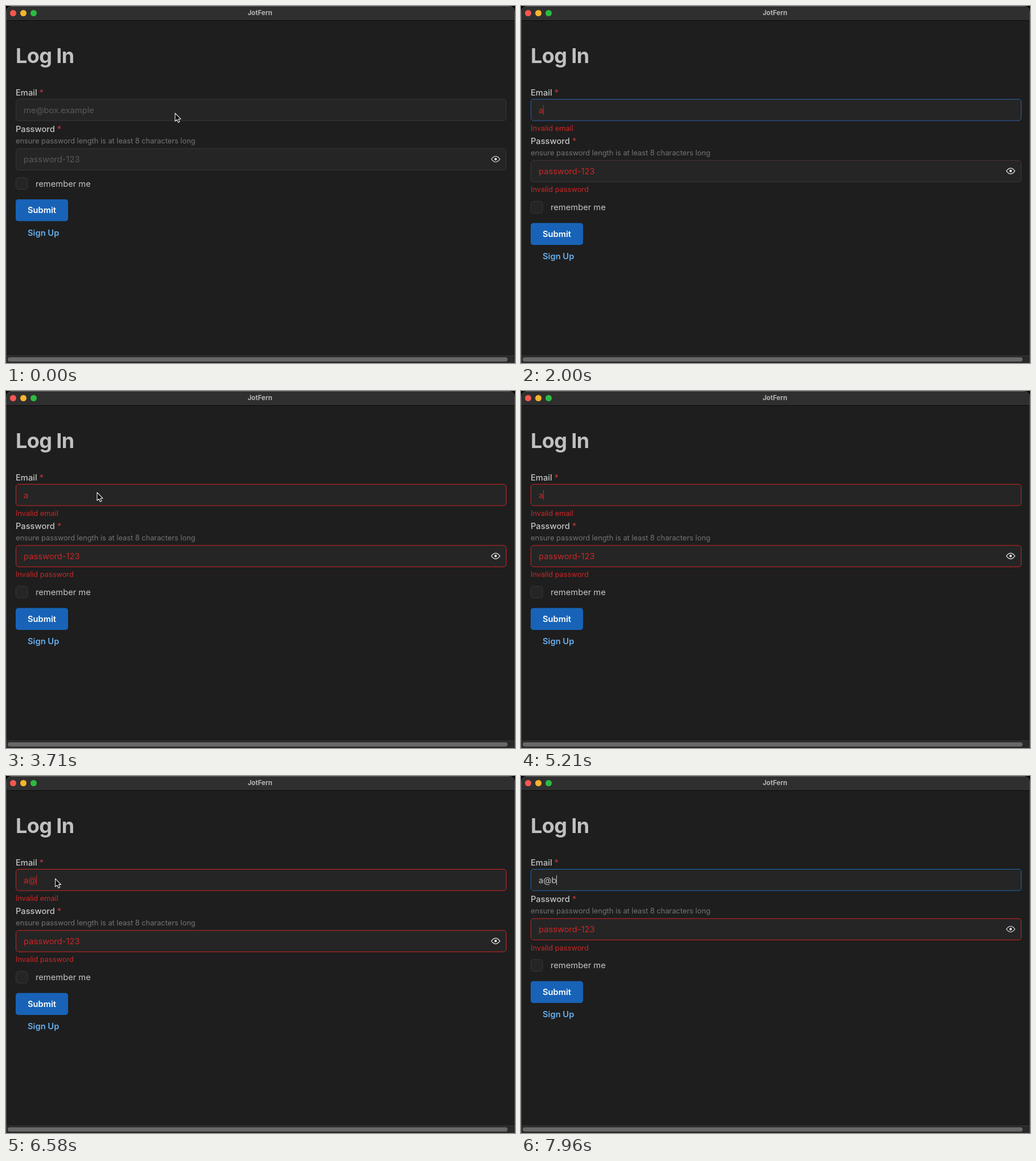
An HTML page that plays this animation: 894x626 px, repeating every 8 s.

```html
<!DOCTYPE html>
<html lang="en">
<head>
<meta charset="utf-8">
<title>Log in form</title>
<style>
  html, body { margin: 0; width: 100%; height: 100%; overflow: hidden; background: #000; }
  svg { display: block; width: 894px; height: 626px; font: 14.7px Inter, sans-serif; fill: #c4c4c4; }
  .box { fill: #252525; stroke: #383838; }
  .label { font-weight: 500; }
  .star { fill: #b8323c; }
  .small { font-size: 12.8px; }
  .hint { fill: #747474; }
  .error { fill: #cb2627; }
  .strong { font-weight: 600; }
</style>
</head>
<body>
<svg viewBox="0 0 894 626">
  <rect x=".5" y=".5" width="893" height="640" rx="9" fill="#1e1e1e" stroke="#505050"/>
  <path d="M1 25V10Q1 1 10 1H884Q893 1 893 10V25Z" fill="#2f2f2f"/>
  <path d="M9 .5H885" stroke="#626262"/>
  <path d="M1 25.5H893" stroke="#080808"/>
  <circle cx="12.5" cy="12.5" r="5.5" fill="#f4584f"/>
  <circle cx="30.5" cy="12.5" r="5.5" fill="#f6b42c"/>
  <circle cx="48.5" cy="12.5" r="5.5" fill="#2bbb41"/>
  <text x="446" y="16.3" font-size="11.5" font-weight="700" text-anchor="middle" fill="#b4b4b4">JotFern</text>
  <path d="M1 613H893V626H1Z" fill="#292929"/>
  <path d="M1 613.5H893" stroke="#393939"/>
  <rect x="3" y="616" width="878" height="7.5" rx="3.75" fill="#686868"/>

  <text x="17" y="99.5" font-size="36" font-weight="700" letter-spacing="-.6" fill="#c0c0c0">Log In</text>

  <text class="label" x="17" y="156.5">Email <tspan class="star">*</tspan></text>
  <rect id="emailBox" class="box" x="17.5" y="163.5" width="861" height="37.5" rx="4.5"/>
  <text id="email" x="31" y="187.8"></text>
  <rect id="caret" y="174" width="1" height="17"/>
  <text id="emailError" class="small error" x="17" y="219.3">Invalid email</text>

  <g id="passwordGroup">
    <text class="label" x="17" y="221">Password <tspan class="star">*</tspan></text>
    <text class="small hint" x="17" y="241">ensure password length is at least 8 characters long</text>
    <rect id="passwordBox" class="box" x="17.5" y="250" width="861" height="37.5" rx="4.5"/>
    <text id="password" x="31" y="273.8">password-123</text>
    <g fill="none" stroke="#e6e6e6" stroke-width="1.2">
      <path d="M852.5 268.5Q860 258.5 867.5 268.5Q860 278.5 852.5 268.5Z"/>
      <circle cx="860" cy="268.5" r="1.6" fill="#e6e6e6"/>
    </g>
    <text id="passwordError" class="small error" x="17" y="305.7">Invalid password</text>
  </g>

  <g id="actions">
    <rect class="box" x="17.5" y="301" width="20.5" height="20.5" rx="4.5"/>
    <text x="52" y="316.5">remember me</text>
    <rect x="17" y="339" width="92" height="38.3" rx="4.5" fill="#1863b7"/>
    <text class="strong" x="63" y="363" text-anchor="middle" fill="#fff">Submit</text>
    <text class="strong" x="65.7" y="402.5" text-anchor="middle" fill="#68afee">Sign Up</text>
  </g>

  <path id="pointer" d="M0 0V14L3.3 11.2L5.5 16.2L7.9 15.1L5.7 10.2H10Z" fill="#000" stroke="#f4f4f4" stroke-width="1.1" stroke-linejoin="round"/>
</svg>
<script>
const LOOP = 8000, ERROR_HEIGHT = 20.8, BLINK = 500;
const FOCUS = 660, TYPE_A = 1980, TYPE_AT = 5240, TYPE_B = 7720;
const GRAY = [56, 56, 56], BLUE = [28, 104, 185], RED = [205, 36, 36];

// Pointer stops: time, x, y. It hides while typing and returns when moved.
const pointerRuns = [
  { until: TYPE_A, stops: [[0, 297, 188], [680, 180, 181]] },
  { until: 5160, stops: [[3350, 180, 181], [3710, 160, 178], [4230, 108, 181]] },
  { until: TYPE_B, stops: [[6200, 108, 181], [6720, 82, 180], [7500, 80, 179]] }
];

const el = id => document.getElementById(id);
const clamp = v => Math.min(1, Math.max(0, v));
const ease = v => v * v * (3 - 2 * v);
const mix = (a, b, p) => a + (b - a) * p;
const show = (id, on) => el(id).setAttribute('visibility', on ? 'visible' : 'hidden');
const shift = (id, x, y) => el(id).setAttribute('transform', `translate(${x} ${y})`);

// Fades over 100 ms from each colour to the next.
function fade(t, first, ...changes) {
  let color = first;
  for (const [start, next] of changes) {
    const p = ease(clamp((t - start) / 100));
    color = color.map((c, i) => mix(c, next[i], p));
  }
  return `rgb(${color.map(Math.round)})`;
}

function pointerAt(t) {
  const run = pointerRuns.find(r => t >= r.stops[0][0] && t < r.until);
  if (!run) return null;
  const next = run.stops.findIndex(s => s[0] > t);
  if (next < 0) return run.stops.at(-1).slice(1);
  const [t0, x0, y0] = run.stops[next - 1], [t1, x1, y1] = run.stops[next];
  const p = ease((t - t0) / (t1 - t0));
  return [mix(x0, x1, p), mix(y0, y1, p)];
}

function draw(t) {
  const typed = t < TYPE_A ? '' : t < TYPE_AT ? 'a' : t < TYPE_B ? 'a@' : 'a@b';
  const passwordInvalid = t >= TYPE_A;
  const emailInvalid = passwordInvalid && t < TYPE_B;
  const textColor = emailInvalid ? '#cb2627' : '#c4c4c4';

  const email = el('email');
  email.textContent = typed || 'me@box.example';
  email.style.fill = typed ? textColor : '#595959';
  el('emailBox').style.stroke = fade(t, GRAY, [FOCUS, BLUE], [TYPE_A, RED], [TYPE_B, BLUE]);
  el('passwordBox').style.stroke = fade(t, GRAY, [TYPE_A, RED]);
  el('password').style.fill = passwordInvalid ? '#cb2627' : '#595959';

  const lastInput = [TYPE_B, TYPE_AT, TYPE_A, FOCUS].find(time => t >= time);
  show('caret', lastInput !== undefined && (t - lastInput) % (2 * BLINK) < BLINK);
  el('caret').setAttribute('x', Math.round(31 + (typed ? email.getComputedTextLength() : 0)));
  el('caret').style.fill = textColor;

  show('emailError', emailInvalid);
  show('passwordError', passwordInvalid);
  shift('passwordGroup', 0, emailInvalid * ERROR_HEIGHT);
  shift('actions', 0, (emailInvalid + passwordInvalid) * ERROR_HEIGHT);

  const pointer = pointerAt(t);
  show('pointer', pointer);
  if (pointer) shift('pointer', ...pointer);
}

const begin = performance.now();
function tick() {
  draw((performance.now() - begin) % LOOP);
  requestAnimationFrame(tick);
}
tick();
</script>
</body>
</html>
```
